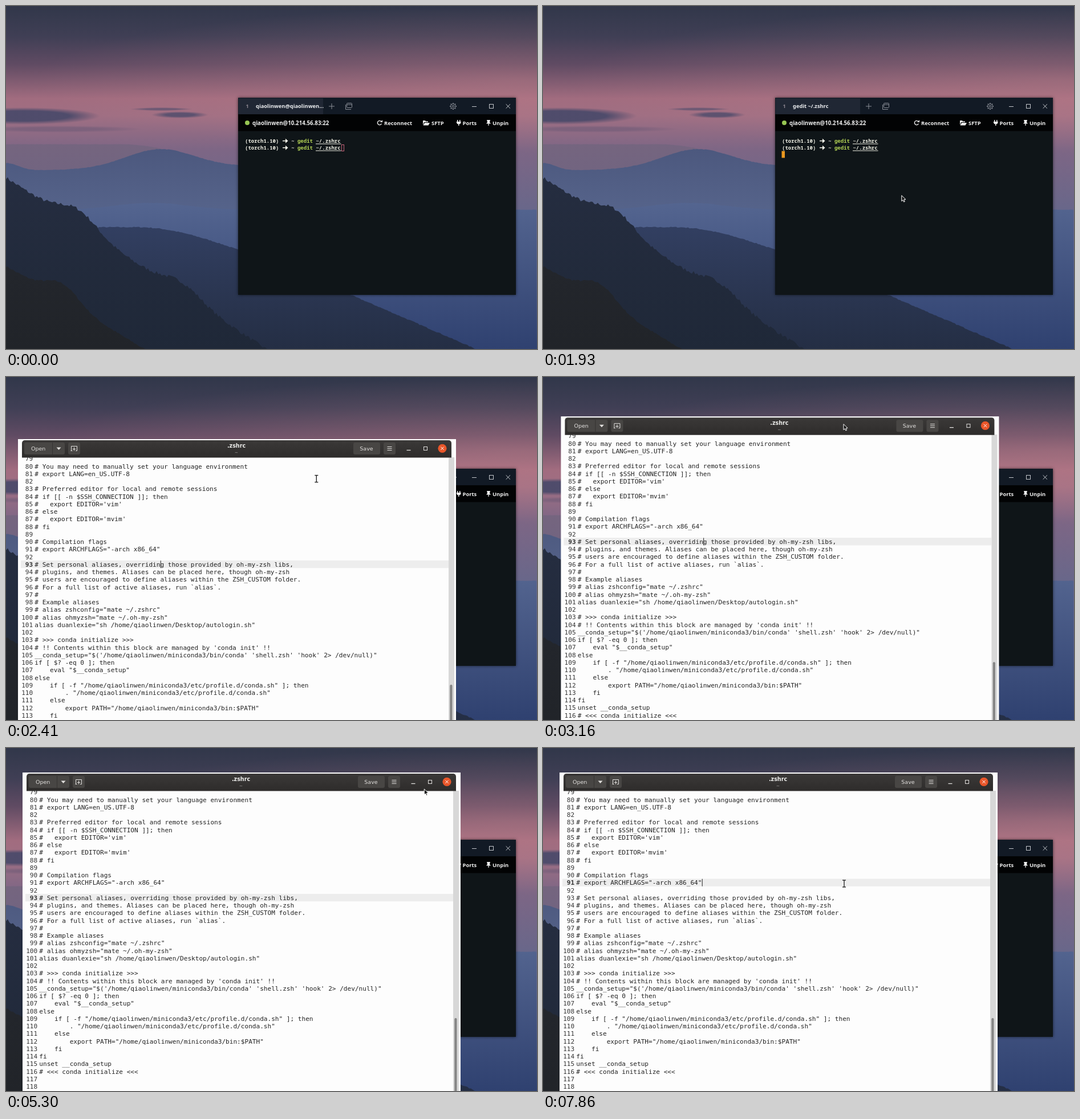
Write an HTML page with a canvas that moves like this. It is 931x602 px and loops after 7990 ms.

```html
<!DOCTYPE html>
<html lang="en">
<head>
<meta charset="utf-8">
<title>Editing a shell profile</title>
<style>
  html, body { margin: 0; width: 100%; height: 100%; overflow: hidden; background: #30364a; }
  canvas { display: block; width: 931px; height: 602px; }
</style>
</head>
<body>
<canvas id="stage" width="931" height="602"></canvas>
<script>
const W = 931, H = 602, LOOP = 7990;
const stage = document.getElementById('stage').getContext('2d');
let c = stage;

const UI = '"DejaVu Sans", sans-serif';
const MONO = '"DejaVu Sans Mono", monospace';
const TERM = '"Noto Sans Mono", monospace';
const BAR = '"Noto Sans", sans-serif';
const USER = 'qiaolinwen';
const HOME = '/home/' + USER;

const DOC = `# If you come from bash you might have to change your $PATH.
# export PATH=$HOME/bin:/usr/local/bin:$PATH

# Path to your oh-my-zsh installation.
export ZSH="${HOME}/.oh-my-zsh"

# Set name of the theme to load --- if set to "random", it will
# load a random theme each time oh-my-zsh is loaded, in which case,
# to know which specific one was loaded, run: echo $RANDOM_THEME
# See the list of themes in $ZSH/themes/
ZSH_THEME="robbyrussell"

# Set list of themes to pick from when loading at random
# Setting this variable when ZSH_THEME=random will cause zsh to load
# a theme from this variable instead of looking in $ZSH/themes/
# If set to an empty array, this variable will have no effect.
# ZSH_THEME_RANDOM_CANDIDATES=( "agnoster" )

# Uncomment the following line to use case-sensitive completion.
# CASE_SENSITIVE="true"

# Uncomment the following line to use hyphen-insensitive completion.
# Case-sensitive completion must be off. _ and - will be interchangeable.
# HYPHEN_INSENSITIVE="true"

# Uncomment the following line to disable bi-weekly auto-update checks.
# DISABLE_AUTO_UPDATE="true"

# Uncomment the following line to automatically update without prompting.
# DISABLE_UPDATE_PROMPT="true"


# Uncomment the following line to change how often to auto-update (in days).
# export UPDATE_ZSH_DAYS=13

# Uncomment the following line if pasting URLs and other text is messed up.
# DISABLE_MAGIC_FUNCTIONS="true"

# Uncomment the following line to disable colors in ls.
# DISABLE_LS_COLORS="true"

# Uncomment the following line to disable auto-setting terminal title.
# DISABLE_AUTO_TITLE="true"

# Uncomment the following line to enable command auto-correction.
# ENABLE_CORRECTION="true"

# Uncomment the following line to display red dots whilst waiting for completion.
# COMPLETION_WAITING_DOTS="true"

# Uncomment the following line if you want to disable marking untracked files
# under VCS as dirty. This makes repository status check for large repositories
# much, much faster.
# DISABLE_UNTRACKED_FILES_DIRTY="true"

# Uncomment the following line if you want to change the command execution time
# stamp shown in the history command output.
# You can set one of the optional three formats:
# "mm/dd/yyyy"|"dd.mm.yyyy"|"yyyy-mm-dd"
# or set a custom format using the strftime function format specifications,
# see 'man strftime' for details.
# HIST_STAMPS="mm/dd/yyyy"

# Would you like to use another custom folder than $ZSH/custom?
# ZSH_CUSTOM=/path/to/new-custom-folder

# Which plugins would you like to load?
# Standard plugins can be found in $ZSH/plugins/
# Custom plugins may be added to $ZSH_CUSTOM/plugins/
# Example format: plugins=(rails git textmate ruby lighthouse)
# Add wisely, as too many plugins slow down shell startup.
plugins=(git)

source $ZSH/oh-my-zsh.sh

# User configuration

# export MANPATH="/usr/local/man:$MANPATH"

# You may need to manually set your language environment
# export LANG=en_US.UTF-8

# Preferred editor for local and remote sessions
# if [[ -n $SSH_CONNECTION ]]; then
#   export EDITOR='vim'
# else
#   export EDITOR='mvim'
# fi

# Compilation flags
# export ARCHFLAGS="-arch x86_64"

# Set personal aliases, overriding those provided by oh-my-zsh libs,
# plugins, and themes. Aliases can be placed here, though oh-my-zsh
# users are encouraged to define aliases within the ZSH_CUSTOM folder.
# For a full list of active aliases, run \`alias\`.
#
# Example aliases
# alias zshconfig="mate ~/.zshrc"
# alias ohmyzsh="mate ~/.oh-my-zsh"
alias duanlexie="sh ${HOME}/Desktop/autologin.sh"

# >>> conda initialize >>>
# !! Contents within this block are managed by 'conda init' !!
__conda_setup="$('${HOME}/miniconda3/bin/conda' 'shell.zsh' 'hook' 2> /dev/null)"
if [ $? -eq 0 ]; then
    eval "$__conda_setup"
else
    if [ -f "${HOME}/miniconda3/etc/profile.d/conda.sh" ]; then
        . "${HOME}/miniconda3/etc/profile.d/conda.sh"
    else
        export PATH="${HOME}/miniconda3/bin:$PATH"
    fi
fi
unset __conda_setup
# <<< conda initialize <<<


`.split('\n');

// drawing helpers
function rect(x, y, w, h, fill) { c.fillStyle = fill; c.fillRect(x, y, w, h); }
function box(x, y, w, h, color) { c.strokeStyle = color; c.lineWidth = 1; c.strokeRect(x, y, w, h); }
function round(x, y, w, h, r, fill, edge) {
  c.beginPath(); c.roundRect(x, y, w, h, r);
  if (fill) { c.fillStyle = fill; c.fill(); }
  if (edge) { c.strokeStyle = edge; c.lineWidth = 1; c.stroke(); }
}
function line(x0, y0, x1, y1, color, width = 1) {
  c.beginPath(); c.moveTo(x0, y0); c.lineTo(x1, y1);
  c.strokeStyle = color; c.lineWidth = width; c.stroke();
}
function shape(path, x, y, fill, edge) {
  const p = new Path2D(path);
  c.save(); c.translate(x, y);
  if (fill) { c.fillStyle = fill; c.fill(p); }
  if (edge) { c.strokeStyle = edge; c.lineWidth = 1; c.stroke(p); }
  c.restore();
}
function cross(x, y, r, color) {
  line(x - r, y - r, x + r, y + r, color);
  line(x + r, y - r, x - r, y + r, color);
}
function arc(x, y, r, from, to, color, width = 1) {
  c.beginPath(); c.arc(x, y, r, from, to);
  c.strokeStyle = color; c.lineWidth = width; c.stroke();
}
function disc(x, y, r, fill) {
  c.beginPath(); c.arc(x, y, r, 0, 7); c.fillStyle = fill; c.fill();
}
function reload(x, y, r, color) {
  arc(x, y, r, 0.4, 5.4, color, 1.4);
  shape('M0 0H4V-4Z', x + 1, y - 1, color);
}
function text(s, x, y, font, color, align = 'left') {
  c.font = font; c.fillStyle = color; c.textAlign = align; c.fillText(s, x, y);
}
function grad(y0, y1, stops) {
  const g = c.createLinearGradient(0, y0, 0, y1);
  stops.forEach(([p, col]) => g.addColorStop(p, col));
  return g;
}
const clamp = v => Math.max(0, Math.min(1, v));
const bump = (x, mid, width) => Math.exp(-(((x - mid) / width) ** 2));

// wallpaper
function ridge(x0, x1, height, top, bottom, rough) {
  let seed = 7, low = H;
  const rnd = () => (seed = seed * 16807 % 2147483647) / 2147483647;
  c.beginPath(); c.moveTo(x0, H);
  for (let x = x0; x <= x1; x += 3) {
    const y = height(x) - rnd() * rough;
    low = Math.min(low, y);
    c.lineTo(x, y);
  }
  c.lineTo(x1, H); c.closePath();
  c.fillStyle = grad(low, H, [[0, top], [1, bottom]]); c.fill();
}
function haze(x, y, rx, ry, rgb, alpha, core = 0) {
  const g = c.createRadialGradient(0, 0, core, 0, 0, 1);
  g.addColorStop(0, `rgba(${rgb},${alpha})`); g.addColorStop(1, `rgba(${rgb},0)`);
  c.save(); c.translate(x, y); c.scale(rx, ry);
  rect(-1, -1, 2, 2, g); c.restore();
}
function paintWallpaper() {
  rect(0, 0, W, H, grad(0, H, [[0, '#31374a'], [0.09, '#403f55'], [0.17, '#604b63'],
    [0.27, '#a16c7f'], [0.32, '#a06f83'], [0.42, '#7d6685'], [0.6, '#68678a']]));
  haze(900, 130, 850, 130, '214,140,146', 0.32);
  const cloud = '75,74,106';
  haze(30, 193, 135, 15, cloud, 0.95, 0.6);
  haze(305, 191, 50, 6, cloud, 0.8, 0.5);
  haze(272, 181, 55, 3, cloud, 0.6, 0.5);
  haze(90, 216, 150, 6, cloud, 0.3, 0.5);
  ridge(0, 407, x => 243 + 0.0015 * Math.max(0, x - 200) ** 2, '#75657f', '#5c6088', 0.6);
  ridge(0, 880, x => 290 - 0.02 * x - 33 * bump(x, 270, 85) - 14 * bump(x, 0, 30),
    '#4c587e', '#6b7da6', 0.8);
  ridge(0, W, x => 358 - 12 * bump(x, 255, 90), '#546590', '#2f4170', 0.8);
  ridge(110, 830, x => 329 + Math.hypot(0.45 * Math.max(0, x - 230), 60), '#323f61', '#242e44', 1.6);
  ridge(0, 460, x => 304 + 0.66 * x - 28 * bump(x, 128, 45) - 20 * bump(x, 310, 45),
    '#252d40', '#1f2838', 6);
  ridge(0, 260, x => 458 + 0.6 * x - 29 * bump(x, 100, 40), '#23262c', '#212429', 3);
}
const wall = new OffscreenCanvas(W, H);
c = wall.getContext('2d');
paintWallpaper();
c = stage;

// terminal
const CELL = 5.41;
function prompt(y) {
  const bold = 'bold 9px ' + TERM, ink = '#f4f4e8', col = n => 419 + n * CELL;
  text('(torch1.10)', col(0), y, bold, ink);
  line(485, y - 3.3, 492, y - 3.3, ink, 1.5);
  shape('M0 -4L4.5 0L0 4Z', 490, y - 3.3, ink);
  text('~', col(15), y, bold, ink);
  text('gedit', col(17), y, '600 9px ' + TERM, '#b4d455');
  text('~/.zshrc', col(23), y, bold, ink);
  line(543, y + 2, 587.5, y + 2, ink);
}
function toolbar() {
  const ink = '#f0f0f0', font = 'bold 9.4px ' + BAR;
  reload(655, 205, 3.6, ink);
  shape('M0 0H4L5 1.5H9V3H2L0 8ZM3 4H12L9.5 8.5H0.5Z', 731, 201, ink);
  shape('M1.5 0H3V3H5.5V0H7V3H8.5L7 7H5V10H3.5V7H1.5L0 3H1.5Z', 789.5, 200, ink);
  shape('M1 0H7L6 4L8 6.5H4.6V10H3.4V6.5H0L2 4Z', 842, 200, ink);
  disc(423, 205, 4, '#96c552');
  text(USER + '@10.214.56.83:22', 432, 208.5, 'bold 9.7px ' + BAR, ink);
  text('Reconnect', 663, 208.5, font, ink);
  text('SFTP', 746, 208.5, font, ink);
  text('Ports', 800.5, 208.5, font, ink);
  text('Unpin', 853, 208.5, font, ink);
}
function titleIcons() {
  const dim = '#8b8f98', ink = '#c4c7cc', y = 176;
  line(566, y, 576, y, dim); line(571, y - 5, 571, y + 5, dim);
  round(597.5, 170.5, 9, 8, 1, null, dim);
  shape('M0 0V8.5H9.5M2 0H11', 595.5, 173, null, dim);
  arc(784, y, 1.8, 0, 7, dim); arc(784, y, 4.3, 0, 7, dim);
  for (let a = 0; a < 8; a++) arc(784, y, 5.2, a * Math.PI / 4 - 0.16, a * Math.PI / 4 + 0.16, dim, 1.4);
  line(817, y + 0.5, 825, y + 0.5, ink);
  box(847.5, 172.5, 7, 7, ink);
  cross(880.3, y, 3.7, ink);
}
function terminal(t) {
  c.save();
  c.shadowColor = '#0009'; c.shadowBlur = 5;
  rect(407, 161, 487, 346, '#0f1518');
  c.restore();
  rect(407, 161, 487, 29, '#121a25');
  rect(408, 162, 148, 28, '#202734');
  rect(407, 190, 487, 29.5, '#020304');
  text('1', 423, 179.3, '600 9px ' + BAR, '#8d8790', 'center');
  text(t < 1400 ? `${USER}@${USER}...` : 'gedit ~/.zshrc', 438, 179.4, '600 9.3px ' + BAR, '#eceef0');
  titleIcons();
  toolbar();
  prompt(240); prompt(252);
  if (t < 460) box(588.5, 243.5, 4, 11, '#c4627a');
  else if (t < 990) rect(587.5, 243, 5.5, 12, '#ea981f');
  else if (t >= 1400) rect(418.5, 254.5, 5.5, 12, '#ea981f');
}

// editor, laid out at its resting place
const ROW = 13.25;
const menuOpen = t => t >= 6340 && t < 6800;
function headerBar(t) {
  const btn = '#484644', ink = '#e2e0de', ui = '9.5px ' + UI;
  const button = (x, w, fill = btn) => round(x, 49, w, 21, 3, fill);
  round(36, 45, 753, 30.5, [5, 5, 0, 0], grad(45, 75, [[0, '#3b3938'], [1, '#2e2c2b']]));
  button(40, 71); line(89.5, 49, 89.5, 70, '#353332');
  text('Open', 52, 62.8, ui, ink);
  shape('M0 0H8L4 4.5Z', 96.5, 57.5, ink);
  button(117, 21);
  shape('M-1 8H2M0 8V0H10V8H7.5M5 2V8M2.3 5H7.7', 122.5, 55.5, null, ink);
  text('.zshrc', 412, 57.6, 'bold 9.6px ' + UI, '#ececea', 'center');
  text('~', 412, 68.5, '7.5px ' + UI, '#a5a3a0', 'center');
  button(617, 47);
  text('Save', 640, 62.8, ui, ink, 'center');
  const hover = t >= 5950 && t < 6900;
  button(670, 21, menuOpen(t) ? '#1c1b1a' : hover ? '#545250' : btn);
  for (let y = 56.5; y < 63; y += 3) line(676.5, y, 684.5, y, ink);
  line(710.5, 62.5, 717.5, 62.5, ink, 1.3);
  box(740.5, 56.5, 6, 6, ink);
  disc(773, 59.3, 7.6, t < 2120 ? '#bd5840' : '#e9562a');
  cross(773, 59.3, 2.7, '#fff');
}
function editor(t, shift) {
  rect(29, 43, 768, 745, '#fdfdfd');
  const yOf = n => 90.5 + (n - 80) * ROW + shift;
  const clicked = t >= 7700, current = clicked ? 91 : 93;
  c.save();
  c.beginPath(); c.rect(29, 75, 755, 715); c.clip();
  rect(34, yOf(current) - 6.7, 750, ROW, '#ededed');
  DOC.forEach((s, i) => {
    const n = i + 1, y = yOf(n) + 4;
    if (y < 70 || y > 800) return;
    text(n, 55.2, y, (n === current ? 'bold ' : '') + '11.09px ' + MONO, '#333', 'right');
    text(s, 58.3, y, '11.09px ' + MONO, '#222');
  });
  if (clicked || (t + 600) % 1200 < 800) rect(278.7, yOf(current) - 6.5, 1, 13, '#222');
  c.restore();
  rect(784, 75, 10, 713, '#d8d8d8');
  round(786.3, 474 - 0.382 * shift, 4.2, 243, 2, '#858585');
  headerBar(t);
}

const MENU = [['New Window'], ['Save As...', 'Save All'],
  ['Find...', 'Find and Replace...', 'Clear Highlight', 'Go to Line...'],
  ['View', 'Tools'], ['Preferences'], ['Keyboard Shortcuts', 'Help', 'About Text Editor']];
function menu() {
  const ink = '#5a5a5a', edge = '#bdbdbd', soft = '#cfcfcf', paper = '#f7f7f7';
  c.save();
  c.shadowColor = '#0005'; c.shadowBlur = 5; c.shadowOffsetY = 1;
  round(592, 84, 178, 324.5, 6, paper);
  c.restore();
  round(592, 84, 178, 324.5, 6, null, edge);
  shape('M0 0L9.5 -8L19 0', 671, 84.5, paper, edge);
  round(601.5, 93.5, 159, 22, 3, '#fafafa', soft);
  line(655.5, 94, 655.5, 115, soft); line(708.5, 94, 708.5, 115, soft);
  reload(628, 104.3, 4.6, ink);
  box(677.5, 98.5, 7, 4, ink); box(675.5, 102.5, 11, 5, ink);
  rect(677, 105, 8, 5, '#fafafa'); box(677.5, 105.5, 7, 4, ink);
  round(731.5, 99.5, 8, 6, 1, '#fafafa', ink); round(728.5, 103.5, 6, 5, 1, '#fafafa', ink);
  let y = 132;
  MENU.forEach((group, i) => {
    if (i) { line(604, y - 7, 758, y - 7, '#dedede'); y += 5; }
    group.forEach(s => {
      text(s, 604.5, y + 3.4, '9.5px ' + UI, s === 'Clear Highlight' ? '#b0b0b0' : ink);
      if (s === 'View' || s === 'Tools') shape('M0 -3.5L4 0L0 3.5Z', 749.5, y, ink);
      y += 19.4;
    });
  });
}

// pointer stops: time, x, y
const STOPS = [[70, 868, 553], [460, 634, 338], [1798, 634, 338], [2070, 613, 316],
  [2550, 516, 122], [3450, 524, 56], [3840, 945, 330], [4280, 945, 562],
  [5030, 752, 74], [5850, 687, 67], [6800, 687, 67], [7680, 528, 238]];
const DRAG_FROM = 2620, DRAG_TO = 3380;

function dragOffset(t) {
  const p = clamp((t - DRAG_FROM) / (DRAG_TO - DRAG_FROM));
  return [-8 * (1 - p) + 6 * Math.sin(Math.PI * p), 66 * (1 - p ** 1.46)];
}
function pointerAt(t) {
  if (t > DRAG_FROM && t < DRAG_TO) {
    const [dx, dy] = dragOffset(t);
    return [524.5 + dx, 56.5 + dy];
  }
  let i = 0;
  while (i < STOPS.length - 2 && t > STOPS[i + 1][0]) i++;
  const [t0, x0, y0] = STOPS[i], [t1, x1, y1] = STOPS[i + 1];
  const p = clamp((t - t0) / (t1 - t0));
  return [x0 + (x1 - x0) * p, y0 + (y1 - y0) * p];
}
function arrow(x, y) {
  shape('M0 0V10L2.3 8L3.9 11.4L5.6 10.6L4.1 7.3L7.2 7Z', x, y, '#161616', '#fff');
}
function beam(x, y) {
  for (const [col, w] of [['#fff', 3], ['#222', 1.4]]) {
    line(x - 3, y - 6, x + 3, y - 6, col, w);
    line(x, y - 6, x, y + 6, col, w);
    line(x - 3, y + 6, x + 3, y + 6, col, w);
  }
}

// motion advances in short even steps
const STEP = 68;
const snap = t => 2070 + Math.floor((t - 2070) / STEP) * STEP;

function draw(t) {
  const s = snap(t), [dx, dy] = dragOffset(s);
  c.drawImage(wall, 0, 0);
  terminal(t);
  const p = clamp((s - 1900) / 250);
  if (p > 0) {
    const rest = p < 1 ? 2 ** (-10 * p) : 0;
    const shift = 1040 * (1 - clamp((s - 2036.7) / 200)) ** 3;
    c.save();
    c.globalAlpha = clamp(1 - 3 * rest);
    c.translate(405, 250); c.scale(1 - 0.4 * rest, 1 - 0.95 * rest); c.translate(-405, -250);
    c.translate(dx, dy);
    editor(t, shift);
    c.restore();
  }
  if (menuOpen(t)) menu();
  if (t >= 70) {
    const [x, y] = pointerAt(s);
    const inText = s >= 2002 && y > 76 + dy && x > 36 + dx && x < 784 + dx;
    (inText && !menuOpen(t) ? beam : arrow)(x, y);
  }
}

function frame(now) {
  draw(now % LOOP);
  requestAnimationFrame(frame);
}
requestAnimationFrame(frame);
</script>
</body>
</html>
```
